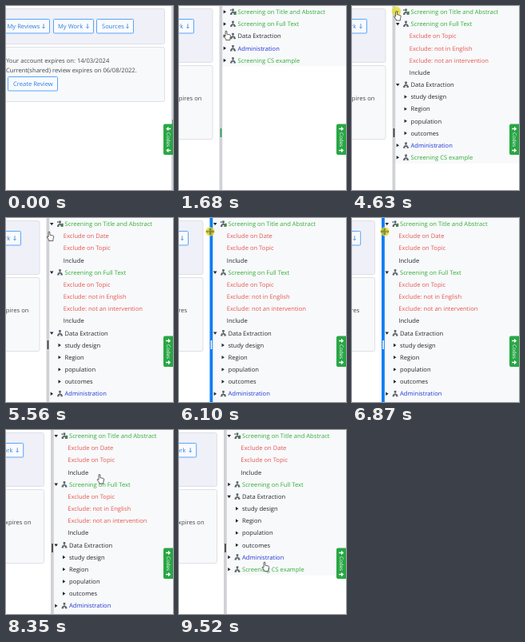
Animation of 209 by 230 pixels, one loop 9.6 s. Source, as an HTML page:

```html
<!DOCTYPE html>
<html lang="en">
<head>
<meta charset="utf-8">
<title>Codes panel</title>
<style>
  html, body { margin: 0; width: 100%; height: 100%; overflow: hidden; background: #fff; }
  svg { display: block; width: 209px; height: 230px; }
  text { font: 7.6px "Open Sans", "Noto Sans", sans-serif; text-rendering: geometricPrecision; white-space: pre; }
</style>
</head>
<body>
<svg id="stage" viewBox="0 0 209 230"></svg>
<script>
const LOOP = 9600, ROW = 15.17, CLOSED = 207;
const INK = '#23282d', GREEN = '#32ad38', RED = '#e4574f', BLUE = '#1f36d2', BAR = '#0d7cf2';
const stage = document.getElementById('stage');

// Keyframes: time followed by values, linear in between
const splitKeys = [[640, CLOSED], [910, 50.5], [5880, 50.5], [6100, 38.5], [6330, 32], [6710, 32],
  [6870, 37], [7250, 55.5], [7479, 55.5], [7480, 56]];
const cursorKeys = [[70, 188, 217], [530, 203, 167], [1060, 203, 167], [1680, 59, 31], [1800, 59, 31],
  [1990, 59, 39], [2600, 59, 39], [3070, 57, 22], [3320, 57, 22], [3700, 53, 14], [3850, 53, 8],
  [4019, 53, 8], [4020, 48, 2], [4220, 48, 2], [4400, 55.5, 6.5], [5020, 55.5, 6.5], [5560, 54, 17],
  [5790, 53, 17], [5880, 53, 17], [6100, 39, 17], [6330, 32, 17], [6710, 32, 17], [6870, 41, 17],
  [7250, 57, 17], [7630, 57, 17], [8100, 160, 46], [8660, 64, 67], [8730, 64, 66], [9300, 64, 66],
  [9520, 107, 165]];
const clicks = [[600, 800], [2220, 2370], [3070, 3240], [4630, 4780], [5790, 7480], [8900, 9050]];
const hovers = [[3620, 4020], [5790, 7710]];

const within = (t, spans) => spans.some(([a, b]) => t >= a && t < b);

function at(keys, t) {
  const i = keys.findIndex(k => k[0] > t);
  if (i === 0) return keys[0].slice(1);
  if (i < 0) return keys[keys.length - 1].slice(1);
  const a = keys[i - 1], b = keys[i], u = (t - a[0]) / (b[0] - a[0]);
  return a.slice(1).map((v, j) => v + (b[j + 1] - v) * u);
}

const text = (x, y, s, fill, more = '') => `<text x="${x}" y="${y}" fill="${fill}" ${more}>${s}</text>`;
const rect = (x, y, w, h, fill, more = '') =>
  `<rect x="${x}" y="${y}" width="${w}" height="${h}" fill="${fill}" ${more}/>`;
const path = (d, fill, more = '') => `<path d="${d}" fill="${fill}" ${more}/>`;
const move = (x, y, body) => `<g transform="translate(${x} ${y})">${body}</g>`;

function button(x, y, w, label, textX, arrowX) {
  const arrow = arrowX
    ? path(`M${arrowX} ${y + 6.2}v5.6m-1.5 -1.6l1.5 1.6l1.5 -1.6`, 'none', 'stroke="#2f7fd6" stroke-width=".8"') : '';
  return rect(x + .5, y + .5, w - 1, 17.5, '#f9fbff', 'rx="1" stroke="#58a6fa"') +
    text(textX, y + 12.4, label, '#2f7fd6') + arrow;
}

function leftPane(split) {
  const shift = (split - CLOSED) * .5815, edge = split - 8;
  const fits = right => right + shift <= edge - 10;
  const box = (y, h, fill) => rect(-9.5, y + .5, edge + 9, h - 1, fill, 'rx="2" stroke="#dfe0e6"');
  const drop = fits(160) ? 0 : 23;
  const lines = fits(129) ? ['Your account expires on: 14/03/2024'] : ['Your account expires on:', '14/03/2024'];
  if (fits(163)) lines.push('Current(shared) review expires on 06/08/2022.');
  else if (fits(119)) lines.push('Current(shared) review expires on', '06/08/2022.');
  else lines.push('Current(shared) review expires', 'on 06/08/2022.');
  const top = 51 + drop, extra = (lines.length - 2) * 12, sx = drop ? 0 : 113;
  return box(3, 45 + drop, '#f0f0f8') + box(top, 69 + extra, '#f8f9fb') + move(shift, 0,
    button(-3, 16, 58, 'My Reviews', 1.5, 47) + button(59, 16, 51, 'My Work', 65, 102) +
    button(sx, 16 + drop, 47, 'Sources', sx + 7, sx + 39) +
    lines.map((s, i) => text(0, top + 20 + 12 * i, s, '#42484e')).join('') +
    button(2, top + 37 + extra, 63, 'Create Review', 9));
}

function treeRows(t) {
  const rows = [];
  const group = (label, color, open, kids = []) => {
    rows.push({ label, color, open, group: true });
    if (open) rows.push(...kids);
  };
  const leaf = label => ({ label, color: label === 'Include' ? INK : RED });
  const branch = label => ({ label, color: INK, branch: true });
  group('Screening on Title and Abstract', GREEN, t >= 4780,
    ['Exclude on Date', 'Exclude on Topic', 'Include'].map(leaf));
  group('Screening on Full Text', GREEN, t >= 3240 && t < 8970,
    ['Exclude on Topic', 'Exclude: not in English', 'Exclude: not an intervention', 'Include'].map(leaf));
  group('Data Extraction', INK, t >= 2370, ['study design', 'Region', 'population', 'outcomes'].map(branch));
  group('Administration', BLUE);
  group('Screening CS example', GREEN);
  return rows;
}

const twist = (x, open) => path(open ? `M${x - 2.3} -1.4h4.6l-2.3 3.4z` : `M${x - 1.5} -2.2v4.4l3.4 -2.2z`, INK);

function icon(x, first) {
  const base = path(`M${x - .6} -1.5h1.2v1.8h2v1.5h.8v1.8h-2.4v-1.8h-2v1.8h-2.4v-1.8h.8v-1.5h2z`, '#59636b') +
    rect(x - 1.3, -3.8, 2.6, 2.6, '#59636b');
  return first ? base + path(`M${x + 1.6} -.5h2.6v4h-2.6z`, '#47824b') + rect(x - 3.5, -3, 1.6, 1.6, '#59636b') : base;
}

function tree(t, split) {
  const rows = treeRows(t);
  return rect(split, 0, 209, 230, '#fff') + rect(split + 4, 0, 209, rows.length * ROW - .5, '#f8f9fb') +
    rows.map((r, i) => move(split, 7.3 + ROW * i,
      (r.group ? twist(6.7, r.open) + icon(17, i === 0) : r.branch ? twist(16.5) : '') +
      text(r.group || r.branch ? 23 : 21.3, 2.7, r.label, r.color))).join('');
}

function splitter(t, split) {
  const hot = within(t, hovers);
  const grip = hot ? '#fff' : t < 3620 ? '#1f9a47' : '#333';
  return rect(split, 0, 3.8, 230, hot ? BAR : '#d1d2d6') +
    rect(split + 1.2, split > 52 ? 142 : 153, 1.6, 11, grip);
}

function codesTab(t) {
  const flip = t < 750 ? -1 : 1;
  const arrow = y => `<g transform="translate(203.2 ${y}) scale(${flip} 1)">` +
    path('M-3 -.7h2.8v-2.1l3.2 2.8l-3.2 2.8v-2.1h-2.8z', '#fff') + '</g>';
  return rect(197, 147.5, 14, 38.5, t > 440 && t < 1140 ? '#218838' : '#28a745', 'rx="2"') + arrow(153.5) + arrow(180.5) +
    text(0, 0, 'Codes', '#fff', 'text-anchor="middle" style="font-size:6.3px" transform="translate(201 167) rotate(90)"');
}

function cursor(t) {
  if (t < 70) return '';
  const [x, y] = at(cursorKeys, t);
  const halo = within(t, clicks) ? '<circle r="5.8" fill="#e6de2c" fill-opacity=".78"/>' : '';
  const line = 'stroke="#222" stroke-width=".7" stroke-linejoin="round"';
  const isArrow = within(t, [[70, 440], [4020, 4300], [7710, 7790]]);
  const shape = within(t, hovers)
    ? path('M-.8 -4v8M.8 -4v8M-1 0h-3.5m1.6 -1.7l-1.7 1.7l1.7 1.7M1 0h3.5m-1.6 -1.7l1.7 1.7l-1.7 1.7', 'none', 'stroke="#45451c" stroke-width=".7"')
    : isArrow ? path('M0 0v10l2.3 -2.1l1.6 3.7l1.6 -.7l-1.6 -3.6h3.2z', '#fff', line)
    : path('M-.9 .6q.9 -1.2 1.8 0v3.6l4 .9q.9 .3 .8 1.3l-.8 3.4v1.8h-5.2v-1.2l-2.5 -3.6q0 -1.4 1.9 -.1z', '#fff', line);
  return move(x, y, halo + shape);
}

function frame() {
  const t = performance.now() % LOOP;
  const [split] = at(splitKeys, t);
  stage.innerHTML = leftPane(split) + tree(t, split) + splitter(t, split) + codesTab(t) + cursor(t);
  requestAnimationFrame(frame);
}
frame();
</script>
</body>
</html>
```
